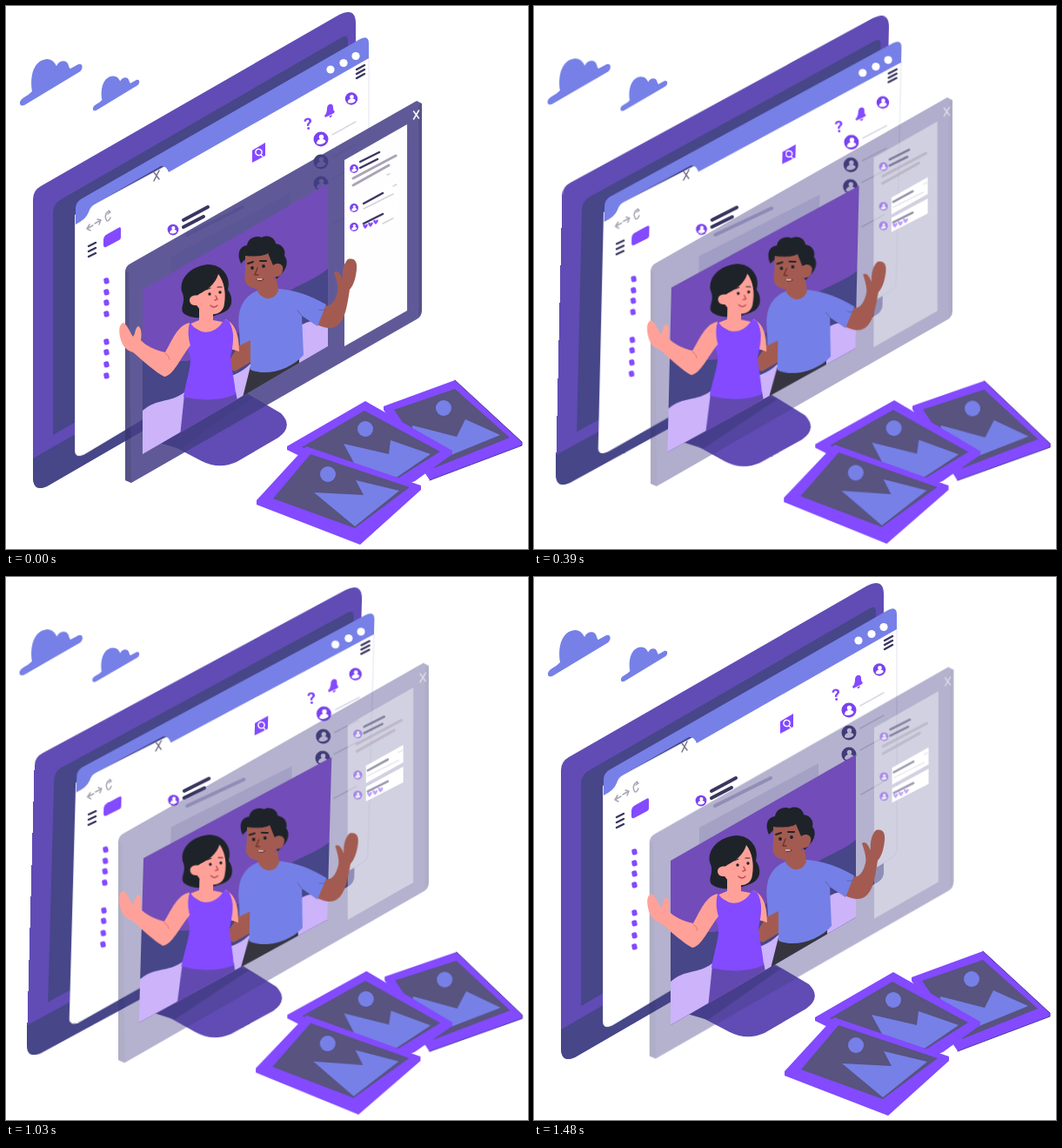
Animation of 600x624 px, one loop 1510 ms. Source, as an HTML page:

```html
<!DOCTYPE html>
<html lang="en">
<head>
<meta charset="utf-8">
<title>Shared photos</title>
<style>
  html, body { margin: 0; width: 100%; height: 100%; overflow: hidden; background: #fff; }
  svg { display: block; width: 600px; height: 624px; }
  .screen { transform-origin: 210px 279px; }
  .photo { transform-origin: 263px 362px; }
  .glass { transform-origin: 308px 329px; }
  .prints { transform-origin: 470px 524px; }
  .clouds { transform-origin: 84px 88px; }
  .line { fill: none; stroke-linecap: round; stroke-linejoin: round; }
  .ink { stroke: #383660; }
  .violet { fill: #834aff; }
  .blue { fill: #7680e7; }
  .slate { fill: #58537f; }
  .pink { fill: #ffa198; }
  .brown { fill: #a35b51; }
  .hair { fill: #1e2329; }
</style>
</head>
<body>
<svg viewBox="0 0 600 624" xmlns="http://www.w3.org/2000/svg">
  <defs>
    <g id="user">
      <circle r="8.500" fill="currentColor"/>
      <circle cx=".5" cy="-2.500" r="2.700" fill="#fff"/>
      <path d="M-5 5C-5-1 4-2 5.500 2.500C4 6-2 7-5 5Z" fill="#fff"/>
    </g>
    <path id="cloud" d="M16 112C15 106 25 104 30 98C27 80 32 62 47 61C53 61 56 65 58 69C62 61 71 62 72 69C73 71 73 72 74 72L83 67C89 65 89 73 84 76L21 114C18 115 16 114 16 112Z"/>
    <path id="heart" d="M0 3C-4 0-3-3-1-2L0-1C2-4 5-2 0 3Z"/>
    <clipPath id="crop"><path d="M100 200H440V350L100 549Z"/></clipPath>
  </defs>

  <g class="clouds blue">
    <use href="#cloud"/>
    <use href="#cloud" transform="translate(88 35) scale(.745)"/>
  </g>

  <g class="screen">
    <!-- monitor -->
    <path fill="#614cb6" d="M31 222Q31 212 40 207L383 10Q402 1 402 20V338Q402 346 396 350L47 552Q31 559 31 541Z"/>
    <path fill="#464688" d="M54 238Q54 228 62 223L386 36Q393 32 393 40V298L54 493ZM31 520L402 306V338Q402 346 396 350L47 552Q31 559 31 541Z"/>
    <!-- browser -->
    <path fill="#fff" stroke="#e3e3ef" d="M79.500 240L417 58V312Q417 319 411 323L90 515Q79.500 520 79.500 511Z"/>
    <path class="blue" d="M80 233Q80 226 86 222L407 38Q417 33 417 43V60L187 191Q184 183 178 184L103 227Q97 230 95 237Q92 245 80 251Z"/>
    <g fill="#fff"><circle cx="373" cy="73" r="4.600"/><circle cx="388" cy="65.500" r="4.600"/><circle cx="402" cy="57.500" r="4.600"/></g>
    <path class="line ink" stroke-width="2.400" d="M403 73l9-5m-9 10l9-5m-9 10l9-5M95 276l8-4m-8 10l8-4m-8 10l8-4"/>
    <path class="line" stroke="#77758a" stroke-width="1.500" d="M170 191l6 8m0-10l-6 12"/>
    <path class="line" stroke="#a9a7b5" stroke-width="1.500" d="M93 256l7-4m-4-1l-3 5l4 2M102 250l7-4m-4-1l4 1l-2 5M120 237c-4-3-7 4-5 8c1 4 4 1 5-2m-2-8l2 2l-3 2"/>
    <path class="violet" d="M112 268Q112 265 115 263L129 255Q132 253 132 256V266Q132 268 130 269L115 277Q112 278 112 275ZM283 166L298 157V172L283 180Z"/>
    <path class="line" stroke="#fff" stroke-width="1.400" d="M287 169a3.500 3.500 0 1 1 7-2a3.500 3.500 0 1 1-7 2M293 171l2 2"/>
    <text x="342" y="142" transform="rotate(-8 347 134)" font-family="Inter, Arial, sans-serif" font-size="18" font-weight="700" fill="#834aff">?</text>
    <path class="violet" d="M366 126Q369 123 369 118C369 112 376 111 376 116Q376 121 378 121L377 123L367 128ZM371 127L375 125Q374 130 371 127Z"/>
    <g color="#7a42f0">
      <use href="#user" transform="translate(397 106.500) scale(.85)"/>
      <use href="#user" transform="translate(362 153)"/>
      <use href="#user" transform="translate(192 257) scale(.75)"/>
    </g>
    <g color="#403b70">
      <use href="#user" transform="translate(362 179)"/>
      <use href="#user" transform="translate(362 204)"/>
    </g>
    <path class="line ink" stroke-width="4" d="M204 246L232 231M204 254L227 242"/>
    <path fill="#e4e3f1" d="M190 288L327 214V300L190 380Z"/>
    <path class="line" stroke="#c4c2d8" stroke-width="4" d="M208 263L272 231"/>
    <path class="line" stroke="#d9d8e4" stroke-width="1.500" d="M375 148L402 133M375 174L402 159M375 199L402 184M376 250L402 235"/>
    <g class="violet" id="menu"></g>
    <!-- stand -->
    <path fill="#614bb4" d="M183 501L225 523Q245 533 265 524L313 496Q331 483 316 468L275 444Z"/>
    <path fill="#4a3f90" d="M176 502L270 446L284 450L200 509Z"/>
  </g>

  <g class="glass">
    <g class="body">
      <path fill="#443f86" d="M137 306Q137 299 143 296L472 109L478 112V350Q478 357 472 360L144 548L137 545Z"/>
      <path fill="#2f2c62" opacity=".5" d="M137 304L141 307L144 548L137 545ZM474 114L478 112V350L474 357Z"/>
    </g>
    <path class="pane" fill="#fff" d="M389 177L461 136V350L389 391Z"/>
    <path fill="#fff" d="M409 222L450 199V218L409 241ZM409 245L450 223V240L409 261Z"/>
    <g class="chat">
      <path class="line" stroke="#fff" stroke-width="1.500" d="M468.500 121l6 8m0-9l-6 10"/>
      <g color="#7a42f0">
        <use href="#user" transform="translate(400 187) scale(.58)"/>
        <use href="#user" transform="translate(400 232) scale(.58)"/>
        <use href="#user" transform="translate(400 254) scale(.58)"/>
      </g>
      <path class="line ink" stroke-width="2.500" d="M407 179L429 168M407 186L427 176M411 227L433 215M411 250L433 239"/>
      <path class="line" stroke="#aaa3b4" stroke-width="3" d="M399 198L448 172M399 206L440 183"/>
      <path class="line" stroke="#d5d2de" stroke-width="1.500" d="M411 233L445 216M433 250L445 244M438 194l3-1M445 207l4-2"/>
      <g class="violet">
        <use href="#heart" x="413" y="253"/><use href="#heart" x="419" y="251"/><use href="#heart" x="425" y="248"/>
      </g>
    </g>
  </g>

  <g class="photo">
    <path fill="#724cb8" d="M157 326L370 204V391L157 515Z"/>
    <path fill="#464688" d="M157 406C180 404 205 414 230 402L300 352C320 322 345 322 370 302V391L157 515Z"/>
    <path fill="#ccb3fa" d="M157 465C175 450 187 457 205 444C230 428 260 432 280 412C310 390 335 364 352 362L370 366V391L157 515Z"/>
    <g clip-path="url(#crop)">
      <!-- man -->
      <path fill="#36353f" d="M281 414L337 404V425L272 450Z"/>
      <path class="brown" d="M258 405C262 398 268 390 276 380L283 384V408L263 420C255 416 255 410 258 405Z"/>
      <path class="brown" d="M365 344C372 346 377 342 380 332C383 325 381 318 377 306C381 303 384 308 387 314C386 305 388 296 393 291C401 289 404 294 403 303C402 312 400 320 395 326C392 345 390 360 381 367C375 372 365 370 357 366Z"/>
      <path fill="#7480e7" d="M291 326C274 333 265 346 268 372L269 390L281 384V418C300 426 327 418 342 401L340 356L358 368L368 343C350 333 335 327 314 325Z"/>
      <path class="brown" d="M288 320L311 313L313 327C309 338 297 340 289 328Z"/>
      <path class="hair" d="M270 296C265 285 268 276 277 275C278 266 288 263 294 266C302 262 309 267 310 273C318 274 322 281 320 287C325 293 322 301 319 305L311 314L305 300L275 291Z"/>
      <path class="brown" d="M275 287C284 288 296 288 301 284L307 298C314 293 320 298 318 304C317 310 312 312 309 311C304 320 298 326 287 325C275 322 273 316 275 306Z"/>
      <path class="line" stroke="#242329" stroke-width="2" d="M278 296l6-2M292 293l7 0"/>
      <path class="line" stroke="#71352d" stroke-width="1.500" d="M289 301l-3 8l4 0M288 314q4 3 8 0"/>
      <g class="hair"><circle cx="283" cy="301" r="1.900"/><circle cx="296" cy="299" r="1.900"/></g>
      <path class="line" stroke="#fff" stroke-width="1.200" d="M289 314l5 0"/>
      <path class="line" stroke="#54679f" stroke-width="1" d="M340 356L335 350M360 349q6 1 7-1"/>
      <!-- woman -->
      <path class="hair" d="M204 353C199 346 208 340 202 328C199 312 213 299 232 297C250 297 259 313 255 326C262 336 260 347 252 351C240 358 214 362 204 353Z"/>
      <path class="pink" d="M252 360C265 365 268 382 268 397L258 394ZM222 342L238 348L238 361L254 364L240 383L210 366L222 361Z"/>
      <path class="pink" d="M222 331C232 326 241 319 244 308C251 317 253 330 251 342C250 354 238 357 229 352C223 350 221 346 219 344C211 345 209 337 213 334C217 331 220 334 222 331Z"/>
      <path class="line" stroke="#2b2530" stroke-width="1.200" d="M230 326l5-2M243 323l5 0"/>
      <g class="hair"><circle cx="234" cy="331" r="1.700"/><circle cx="246" cy="329" r="1.700"/></g>
      <path class="line" stroke="#bd4e56" stroke-width="1.400" d="M241 333l2 4l-3 1M235 344q4 4 8 0"/>
      <path fill="#6249b0" d="M205 446L264 443L269 470L200 495Z"/>
      <path class="violet" d="M212 364C220 378 240 380 251 360L256 362C264 374 261 390 258 404C260 420 263 433 264 446C245 455 220 453 204 449C207 430 213 415 212 402C207 390 206 376 212 364Z"/>
      <path class="pink" d="M211 364C197 367 191 384 183 398C172 396 160 390 155 384C156 378 156 370 152 368C148 370 149 377 146 380C142 374 139 366 135 364C129 366 130 375 131 380C133 390 138 396 146 398C158 408 172 421 182 426C193 424 200 405 212 390C209 380 209 372 211 364Z"/>
      <path class="line" stroke="#df776f" stroke-width="1" d="M183 399q5 3 5 7"/>
    </g>
  </g>

  <g class="prints">
    <path class="violet" d="M516 430L593 501V505L487 545L434 464V460Z"/>
    <path class="slate" d="M516 440L579 496L492 531L446 464Z"/>
    <path class="blue" d="M467 482L518 495L528 475L568 493L470 533Z"/>
    <circle class="blue" cx="503" cy="462" r="9"/>
    <path class="line" stroke="#4b3b92" stroke-width="1" d="M516 430L593 501L593 505L487 545"/>
    <path class="violet" d="M413 454L513 511V515L470 546L430 562L323 510V506Z"/>
    <path class="slate" d="M412 465L499 512L450 543L430 545L340 507Z"/>
    <path class="blue" d="M388 503L440 515L442 499L488 515L450 541L412 547Z"/>
    <circle class="blue" cx="413" cy="486" r="9"/>
    <path class="violet" d="M345 506L477 551V556L407 619L288 573V568Z"/>
    <path class="slate" d="M350 515L464 553L401 600L307 566Z"/>
    <path class="blue" d="M354 559L411 562L402 545L452 557L401 598Z"/>
    <circle class="blue" cx="370" cy="538" r="9"/>
  </g>
</svg>
<script>
  const LOOP = 1510;

  const menu = document.getElementById('menu');
  for (const y of [316, 329, 341, 354, 386, 398, 412, 425]) {
    menu.innerHTML += `<rect x="112.500" y="${y - 3.5}" width="6" height="7" rx="2" transform="rotate(-12 115 ${y})"/>`;
  }

  // Steps are [ms, value]; the loop restarts without a blend.
  const play = (selector, steps, style) => {
    const frames = steps.map(([ms, v]) => ({ offset: ms / LOOP, ...style(v) }));
    document.querySelectorAll(selector).forEach(el =>
      el.animate(frames, { duration: LOOP, iterations: Infinity }));
  };
  const rotate = deg => v => ({ transform: `rotate(${v * deg}deg)` });
  const fade = v => ({ opacity: v });

  const sway = [[0, 0], [30, .02], [150, .26], [270, .54], [390, .78], [520, .93], [670, .99],
    [800, 1], [930, .99], [1030, .93], [1120, .75], [1210, .53], [1350, .22], [1480, 0], [LOOP, 0]];
  play('.screen, .photo', sway, rotate(1.7));
  play('.prints', sway, rotate(1.2));
  play('.clouds', sway, rotate(1.3));

  play('.glass', [[0, 1], [1060, 1.048], [1480, 1.025], [LOOP, 1.025]], v => ({ transform: `scale(${v})` }));
  play('.body', [[0, .86], [150, .6], [270, .48], [390, .42], [600, .4], [LOOP, .4]], fade);
  play('.pane', [[0, 1], [150, .6], [390, .42], [600, .4], [LOOP, .4]], fade);
  play('.chat', [[0, 1], [150, .75], [390, .55], [LOOP, .48]], fade);
</script>
</body>
</html>
```
